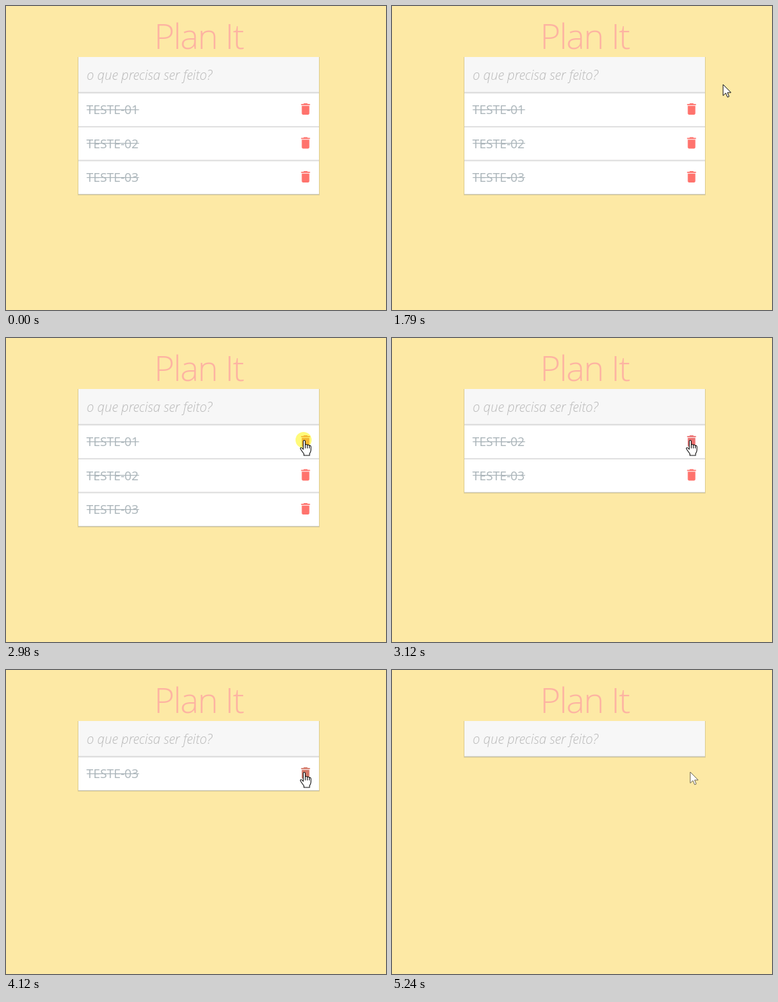
An HTML page that plays this animation: 567x453 px, repeating every 5900 ms.

```html
<!DOCTYPE html>
<html lang="pt">
<head>
<meta charset="utf-8">
<title>Lista</title>
<style>
  html, body { margin: 0; width: 100%; height: 100%; overflow: hidden; background: #fde9a5; }
  svg { display: block; width: 567px; height: 453px; font-family: "Open Sans", "Noto Sans", sans-serif; }
  .title { font-size: 52px; font-weight: 300; letter-spacing: -1.6px; fill: #fdb3a2; }
  .hint { font-size: 19.5px; font-weight: 300; font-style: italic; fill: #b9b9b9; }
  .item { font-size: 18.4px; fill: #abb5ba; }
</style>
</head>
<body>
<svg viewBox="0 0 567 453">
  <defs>
    <path id="bin" d="M6 19c0 1.1.9 2 2 2h8c1.1 0 2-.9 2-2V7H6v12zM19 4h-3.5l-1-1h-5l-1 1H5v2h14V4z"/>
  </defs>
  <rect width="567" height="453" fill="#fde9a5"/>
  <text class="title" x="221" y="64">Plan It</text>
  <rect id="halo" x="107" y="76" width="361" fill="#000" opacity=".12"/>
  <rect id="edge" x="108" y="76" width="359" fill="#c3c1b4"/>
  <rect x="108" y="76" width="359" height="52.5" fill="#f7f7f7"/>
  <text class="hint" x="120.5" y="110">o que precisa ser feito?</text>
  <g id="rows"></g>
  <circle id="click" cx="444" cy="152" r="12" fill="#fff500" opacity=".52"/>
  <g id="cursor" stroke-linejoin="round">
    <path id="arrow" d="M0 0V16.5L4 12.8L6.6 18.8L9 17.8L6.5 12H11.8Z" fill="#fff"/>
    <g id="hand" transform="translate(-6.5 0)" stroke="#111" stroke-width="1.1" stroke-linecap="round">
      <path fill="#fff" d="M5 14V2Q5 .5 6.5 .5T8 2V8Q8 6.5 9.5 6.5T11 8.2Q11 7 12.5 7.2T14 9Q14 8.2 15.2 8.4Q16.5 8.7 16.5 10V15Q16.5 18 14.5 20V23H6V20.5Q4 18 1 13.5Q0 11.5 2 11.5Q3.2 11.5 5 14Z"/>
      <path fill="none" d="M8 8v4M11 8.5v3.5M14 9.5v2.5"/>
    </g>
  </g>
</svg>
<script>
const LOOP = 5900, TOP = 129, PITCH = 50.5, RED = '#ff736d';
const MOVE = 1520, STEP = 200 / 3, HAND_STEP = 9;
const clicks = [[2980, 3120], [3980, 4120], [5110, 5240]];
const hover = ['#e8746c', '#ec7272', '#d47868'];
const path = [
  [565, 252], [546, 212], [526, 172], [508, 139], [494, 117], [484, 106], [476, 109],
  [470, 118], [466, 127], [461, 131], [455, 137], [449, 146], [445, 152]
];
const $ = id => document.getElementById(id);
const show = (el, on) => el.setAttribute('visibility', on ? 'visible' : 'hidden');

const rows = [0, 1, 2].map(i => {
  const g = document.createElementNS('http://www.w3.org/2000/svg', 'g');
  const y = TOP + i * PITCH;
  g.innerHTML = `
    <rect x="108" y="${y - 0.5}" width="359" height="1.7" fill="#dfdfe1"/>
    <rect x="108" y="${y + 1.2}" width="359" height="49" fill="#fff"/>
    <text class="item" x="120" y="${y + 32}"></text>
    <rect x="120.5" y="${Math.floor(y + 25)}" width="78" height="1.2" fill="#abb5ba"/>
    <use href="#bin" transform="translate(435.7 ${y + 13.2}) scale(.94)"/>`;
  $('rows').append(g);
  return { g, label: g.querySelector('text'), bin: g.querySelector('use') };
});

function draw(t) {
  const gone = clicks.filter(c => t >= c[1]).length;
  const left = 3 - gone;
  const step = Math.min(path.length - 1, Math.floor((t - MOVE) / STEP + 0.01));
  const over = step === path.length - 1;

  rows.forEach((row, i) => {
    show(row.g, i < left);
    row.label.textContent = 'TESTE-0' + (i + 1 + gone);
    row.bin.setAttribute('fill', i === 0 && over && left ? hover[gone] : RED);
  });

  const bottom = TOP + left * PITCH;
  $('edge').setAttribute('height', bottom + 0.7 - 76);
  $('halo').setAttribute('height', bottom + 1.6 - 76);
  show($('click'), clicks.some(([a, b]) => t >= a && t < b));

  const pointing = step >= HAND_STEP && left > 0;
  show($('hand'), step >= 0 && pointing);
  show($('arrow'), step >= 0 && !pointing);
  $('arrow').setAttribute('stroke', left ? '#111' : '#6f6751');
  const [x, y] = path[Math.max(0, step)];
  $('cursor').setAttribute('transform', `translate(${x} ${y})`);
}

const start = performance.now();
function tick() {
  draw((performance.now() - start) % LOOP);
  requestAnimationFrame(tick);
}
tick();
</script>
</body>
</html>
```
